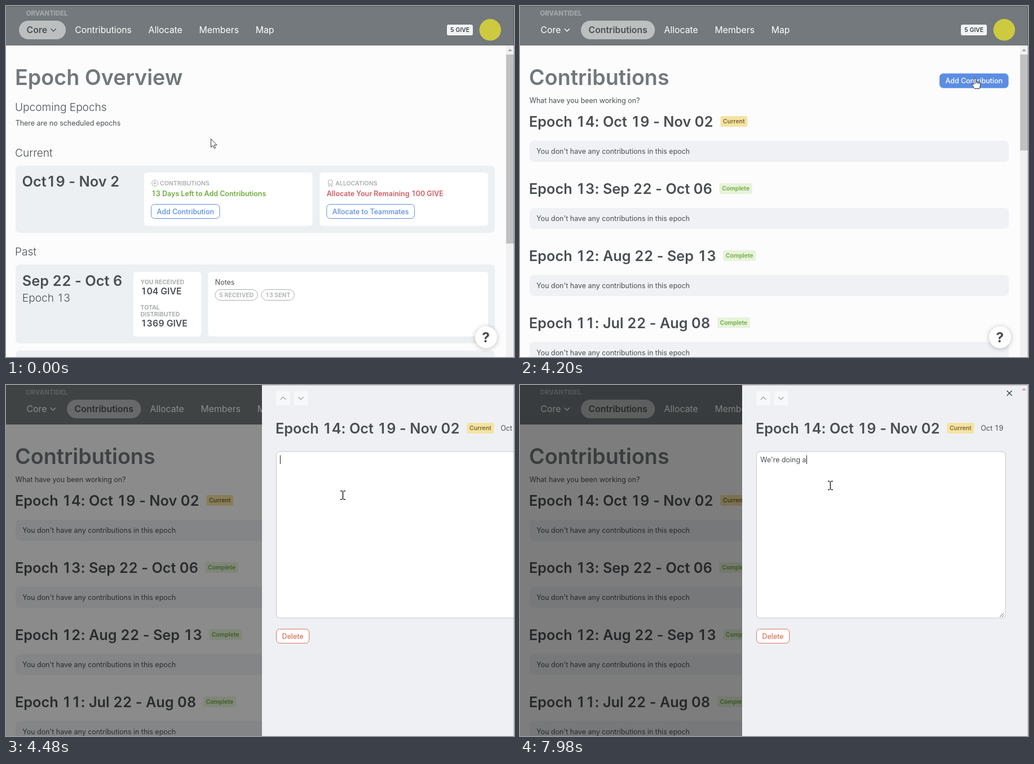
An HTML page with a canvas that plays this animation: 901x622 px, repeating every 8000 ms.

```html
<!DOCTYPE html>
<html lang="en">
<head>
<meta charset="utf-8">
<title>Contributions walkthrough</title>
<style>
html, body { margin: 0; width: 100%; height: 100%; overflow: hidden; background: #fcfcfc; }
canvas { display: block; width: 901px; height: 622px; }
</style>
</head>
<body>
<canvas id="stage"></canvas>
<script>
const W = 901, H = 622, LOOP = 8000;
const canvas = document.getElementById('stage');
const ctx = canvas.getContext('2d');
const dpr = window.devicePixelRatio || 1;
canvas.width = W * dpr;
canvas.height = H * dpr;

const INK = '#4a4f52', TITLE = '#72787b', LABEL = '#a9adaf', BLUE = '#5b8de4';
const GREEN = '#70ab3f', RED = '#cf5c64', PANEL = '#ecf0f3';
const BODY = 12.46, SMALL = 10.5, NAV = 15.8, SUB = 19.1, HEAD = 25.3, HUGE = 37.7;
const LEFT = 17, WIDE = 850;

const clamp = v => Math.max(0, Math.min(1, v));
const ramp = (t, a, b) => clamp((t - a) / (b - a));
const easeOut = (u, power) => 1 - (1 - u) ** power;

// Walks a string with tabular digits and returns its width
function eachPart(str, size, weight, visit) {
  ctx.font = `${weight} ${size}px Inter, sans-serif`;
  const digit = ctx.measureText('0').width;
  let x = 0;
  for (const part of str.split(/(\d)/)) {
    const w = ctx.measureText(part).width;
    const cell = /\d/.test(part) ? digit : w;
    visit?.(part, x + (cell - w) / 2);
    x += cell;
  }
  return x;
}

const width = (str, size, weight = 400) => eachPart(str, size, weight);

function text(str, x, y, size, weight = 400, color = INK) {
  ctx.fillStyle = color;
  return x + eachPart(str, size, weight, (part, dx) => ctx.fillText(part, x + dx, y));
}

function box(x, y, w, h, r, fill, stroke) {
  ctx.beginPath();
  ctx.roundRect(x, y, w, h, r);
  if (fill) { ctx.fillStyle = fill; ctx.fill(); }
  if (stroke) { ctx.strokeStyle = stroke; ctx.lineWidth = 1; ctx.stroke(); }
}

function lines(color, weight, ...paths) {
  ctx.strokeStyle = color;
  ctx.lineWidth = weight;
  ctx.beginPath();
  for (const p of paths)
    for (let i = 0; i < p.length; i += 2) ctx[i ? 'lineTo' : 'moveTo'](p[i], p[i + 1]);
  ctx.stroke();
}

function poly(points, fill, stroke) {
  ctx.beginPath();
  for (let i = 0; i < points.length; i += 2) ctx.lineTo(points[i], points[i + 1]);
  ctx.closePath();
  ctx.fillStyle = fill;
  ctx.fill();
  if (stroke) { ctx.strokeStyle = stroke; ctx.lineWidth = 1; ctx.stroke(); }
}

const disc = (x, y, r, fill, stroke) => box(x - r, y - r, 2 * r, 2 * r, r, fill, stroke);

const chevron = (x, y, h, color) =>
  lines(color, 1.4, [x - 4.6, y - h / 2, x, y + h / 2, x + 4.6, y - h / 2]);

function button(label, x, y, hot, color = BLUE) {
  box(x + .5, y + .5, width(label, BODY, 500) + 20, 25, 6, hot ? color : '#fff', color);
  text(label, x + 10.5, y + 17.8, BODY, 500, hot ? '#fff' : color);
}

function badge(label, x, y, fill, color) {
  const w = width(label, SMALL, 600) + 9;
  box(x, y, w, 19, 3, fill);
  text(label, x + 4.5, y + 13.3, SMALL, 600, color);
  return x + w;
}

function pill(label, x, y) {
  const w = width(label, SMALL, 600) + 14;
  box(x, y, w, 19, 9.5, null, LABEL);
  text(label, x + 7, y + 13.5, SMALL, 600, LABEL);
  return x + w;
}

// Epoch heading with its state badge; returns the right end
function epochHeading(name, x, y, isCurrent) {
  const end = text(name, x, y, HEAD, 600) + 12.5;
  return isCurrent ? badge('Current', end, y - 19, '#f5e3a2', '#7c6a35')
    : badge('Complete', end, y - 19, '#e7f3dc', GREEN);
}

function header(page) {
  const pad = 13.5, arrow = 19.5;
  ctx.fillStyle = '#73797c';
  ctx.fillRect(0, 0, W, 70);
  text('ORVANTIDEL', 35.5, 17, 11.4, 800, '#a4a8aa');
  let x = 23;
  ['Core', 'Contributions', 'Allocate', 'Members', 'Map'].forEach((name, i) => {
    const on = i === page, weight = on ? 600 : 400, color = on ? INK : '#fff';
    const w = width(name, NAV, weight) + 2 * pad + (i ? 0 : arrow);
    if (on) box(x, 26, w, 33, 16.5, '#bcbfc0');
    const end = text(name, x + pad, 48.3, NAV, weight, color);
    if (!i) chevron(end + 11, 42.5, 4.5, color);
    x += w + 2.7;
  });
  box(782, 33, 46, 19, 3, '#f1f3f5');
  text('5 GIVE', 788, 46, SMALL, 500, '#22262a');
  disc(858.8, 42.3, 19.2, '#cdca40');
}

function scrollbar(end) {
  ctx.fillStyle = '#f1f1f1';
  ctx.fillRect(887, 70, 14, H - 70);
  ctx.fillStyle = '#c1c1c1';
  ctx.fillRect(887, 86, 14, end - 86);
  poly([890, 80, 898, 80, 894, 76], '#a3a3a3');
}

function help() {
  ctx.save();
  ctx.shadowColor = 'rgba(0,0,0,.25)';
  ctx.shadowBlur = 8 * dpr;
  ctx.shadowOffsetY = dpr;
  disc(851.5, 587, 19.5, '#fff');
  ctx.restore();
  text('?', 844.3, 596, 24.5, 700, '#44494c');
}

function plusIcon(x, y) {
  disc(x, y, 5.3, null, LABEL);
  lines(LABEL, 1, [x - 3, y, x + 3, y], [x, y - 3, x, y + 3]);
}

function ribbonIcon(x, y) {
  disc(x, y - 2, 4, null, LABEL);
  lines(LABEL, 1, [x - 2.5, y + 1, x - 3, y + 6, x, y + 4, x + 3, y + 6, x + 2.5, y + 1]);
}

function taskCard(x, icon, label, note, color, action, hot) {
  box(x, 295, 298.5, 94.5, 5, '#fff');
  icon(x + 19, 314);
  text(label, x + 28, 317.8, SMALL, 600, LABEL);
  text(note, x + 12.5, 337, BODY, 600, color);
  button(action, x + 12, 351, hot);
}

function stat(labels, value, y) {
  labels.forEach((label, i) => text(label, 238.5, y + 12 * i, SMALL, 700, LABEL));
  text(value, 239, y + 12 * labels.length + 6, NAV, 600);
}

function overview(hot) {
  text('Epoch Overview', 16, 139.5, HUGE, 600, TITLE);
  text('Upcoming Epochs', 16, 186, SUB, 300);
  text('There are no scheduled epochs', 16.7, 212, BODY);
  text('Current', 16, 267, SUB, 300);
  text('Past', 16, 442, SUB, 300);

  box(LEFT, 283, WIDE, 119, 8, PANEL);
  text('Oct19 - Nov 2', 28.5, 320, HEAD, 600);
  taskCard(245, plusIcon, 'CONTRIBUTIONS', '13 Days Left to Add Contributions',
    GREEN, 'Add Contribution', hot);
  taskCard(556.3, ribbonIcon, 'ALLOCATIONS', 'Allocate Your Remaining 100 GIVE',
    RED, 'Allocate to Teammates');

  box(LEFT, 458, WIDE, 140, 8, PANEL);
  text('Sep 22 - Oct 6', 28.8, 495.5, HEAD, 600);
  text('Epoch 13', 28.8, 523.5, SUB, 300);
  box(226, 471, 120, 114.5, 5, '#fff');
  stat(['YOU RECEIVED'], '104 GIVE', 493);
  stat(['TOTAL', 'DISTRIBUTED'], '1369 GIVE', 538);
  box(358.5, 471, 496.5, 114.5, 5, '#fff');
  text('Notes', 370.8, 493.5, BODY);
  pill('13 SENT', pill('5 RECEIVED', 371, 502.5) + 6.5, 502.5);
  box(LEFT, 610.5, WIDE, 40, 8, PANEL);
}

const EPOCHS = ['Oct 19 - Nov 02', 'Sep 22 - Oct 06', 'Aug 22 - Sep 13', 'Jul 22 - Aug 08']
  .map((dates, i) => `Epoch ${14 - i}: ${dates}`);

function contributions(hot) {
  text('Contributions', 16, 139.5, HUGE, 600, TITLE);
  text('What have you been working on?', 16.7, 171.5, BODY);
  button('Add Contribution', 744, 119.5, hot);
  EPOCHS.forEach((name, i) => {
    const y = 214 + i * 118.9;
    epochHeading(name, 16, y, i === 0);
    box(LEFT, y + 24.8, WIDE, 37.5, 8, '#eff1f4');
    text("You don't have any contributions in this epoch", 29.2, y + 48, BODY);
  });
}

function statusBar(alpha) {
  if (!alpha) return;
  ctx.globalAlpha = alpha;
  box(-4, 615.5, 291, 20, 4, '#35363c');
  text('app.example.org/circles/contributions/new', 6, 630, 11, 400, '#c9cacd');
  ctx.globalAlpha = 1;
}

// Typing comes in short bursts with an even pace inside each
const BURSTS = [[6080, 'W'], [6370, 'e'], [6620, "'re "], [7330, 'do'], [7620, 'i'],
  [7820, 'ng'], [7980, ' a']];
const PACE = 80, BLINK = 530, FOCUS = 4150;

const typedAt = t => BURSTS.map(([start, str]) => {
  const rate = start === LOOP - 20 ? 0 : PACE;
  return t < start ? '' : rate ? str.slice(0, 1 + Math.floor((t - start) / rate)) : str;
}).join('');

function drawer(t, x) {
  ctx.save();
  ctx.translate(x, 0);
  ctx.fillStyle = '#eef0f4';
  ctx.fillRect(0, 0, W, H);
  for (const side of [0, 1]) {
    const bx = 25 + 31.5 * side;
    box(bx, 11, 25, 25, 4, '#f7f8fa');
    chevron(bx + 12.5, 23.5, side ? 4.5 : -4.5, '#a3a7aa');
  }
  const end = epochHeading(EPOCHS[0], 24, 86, true);
  text('Oct 19', end + 12, 81.4, BODY);
  lines('#33373a', 1.3, [469.5, 10, 478.5, 19], [478.5, 10, 469.5, 19]);
  poly([496, 9.5, 504, 9.5, 500, 5.5], '#d99a96');

  box(25.5, 118, 441.5, 295, 6, '#fff', '#c4c7ca');
  lines('#55595c', 1, [457, 411, 464, 404], [461, 411, 464, 408]);
  const typed = typedAt(t);
  const caret = text(typed, 32.3, 136.8, BODY);
  if (typed || Math.floor((t - FOCUS) / BLINK) % 2 === 0) {
    ctx.fillStyle = '#222';
    ctx.fillRect(Math.round(caret), 124.5, 1, 15.5);
  }
  button('Delete', 25, 432, false, '#d8735f');
  ctx.restore();
}

// Pointer stops: time, x, y
const STOPS = [[820, 363, 235], [1700, 341, 366], [3030, 341, 366], [3350, 686.5, 163],
  [3560, 800, 113], [3820, 807, 127], [4300, 807, 127], [4480, 598, 195], [4820, 302, 316],
  [5330, 550, 178]];

// Monotone cubic through the stops, so holds stay still and nothing overshoots
function along(time, axis) {
  const last = STOPS.length - 1;
  const t = Math.max(STOPS[0][0], Math.min(STOPS[last][0], time));
  const slope = i => {
    const a = STOPS[i], b = STOPS[i + 1];
    return a && b ? (b[axis] - a[axis]) / (b[0] - a[0]) : 0;
  };
  const tangent = i => {
    const a = slope(i - 1), b = slope(i);
    return a * b <= 0 ? 0 : 2 * a * b / (a + b);
  };
  let i = 0;
  while (i < last - 1 && t >= STOPS[i + 1][0]) i++;
  const p = STOPS[i], q = STOPS[i + 1], d = q[0] - p[0], u = (t - p[0]) / d, v = 1 - u;
  return p[axis] * (1 + 2 * u) * v * v + q[axis] * u * u * (3 - 2 * u)
    + d * (tangent(i) * u * v * v - tangent(i + 1) * u * u * v);
}

const inside = (x, y, l, t, w, h) => x >= l && x <= l + w && y >= t && y <= t + h;

const POINTERS = {
  arrow() {
    poly([.5, .5, .5, 15.3, 3.9, 12.2, 6.2, 17.3, 8.5, 16.3, 6.3, 11.3, 11, 11.3], '#fff', '#333');
  },
  hand() {
    poly([-2, 12, -5.5, 10.5, -5, 13, -1, 19.5, 8, 19.5, 9.5, 13, 9.5, 9, 1.5, 7], '#fff', '#333');
    box(-1.5, .5, 3, 12, 1.5, '#fff', '#333');
    ctx.fillStyle = '#fff';
    ctx.fillRect(-1.6, 11, 4, 3);
    lines('#333', 1, [4.5, 8, 4.5, 11], [7, 8.5, 7, 11.5]);
  },
  beam() {
    lines('#222', 1.6, [.5, -7, .5, 7]);
    for (const y of [-7.5, 7.5])
      lines('#222', 1.5, [-4, y, -.5, y], [1.5, y, 5, y]);
  }
};

function draw(t) {
  ctx.setTransform(dpr, 0, 0, dpr, 0, 0);
  ctx.fillStyle = '#fcfcfc';
  ctx.fillRect(0, 0, W, H);

  const page = t < 2200 ? 0 : 1, closing = 4204;
  const x = along(t, 1), y = along(t, 2);
  const hot = t < closing && (page ? inside(x, y, 744, 120, 123, 25) : inside(x, y, 257, 351, 123, 26));

  header(page);
  (page ? contributions : overview)(hot);
  scrollbar(page ? 256 : 421);
  help();
  statusBar(ramp(t, 1800, 1940) * (1 - ramp(t, 2580, 2780)));

  const dim = .5 * easeOut(ramp(t, closing, 4607), 2);
  ctx.fillStyle = `rgba(0,0,0,${dim})`;
  ctx.fillRect(0, 0, W, H);
  const left = W - 507 * easeOut(ramp(t, 4314, 4642), 3);
  if (left < W) drawer(t, left);

  ctx.fillStyle = 'rgba(0,0,0,.2)';
  ctx.fillRect(0, 0, W, 1);
  ctx.fillRect(W - 1, 1, 1, H);

  const inField = inside(x, y, left + 25, 118, 442, 295);
  ctx.translate(x, y);
  POINTERS[hot ? 'hand' : inField ? 'beam' : 'arrow']();
}

function tick() {
  draw(performance.now() % LOOP);
  requestAnimationFrame(tick);
}
tick();
</script>
</body>
</html>
```
